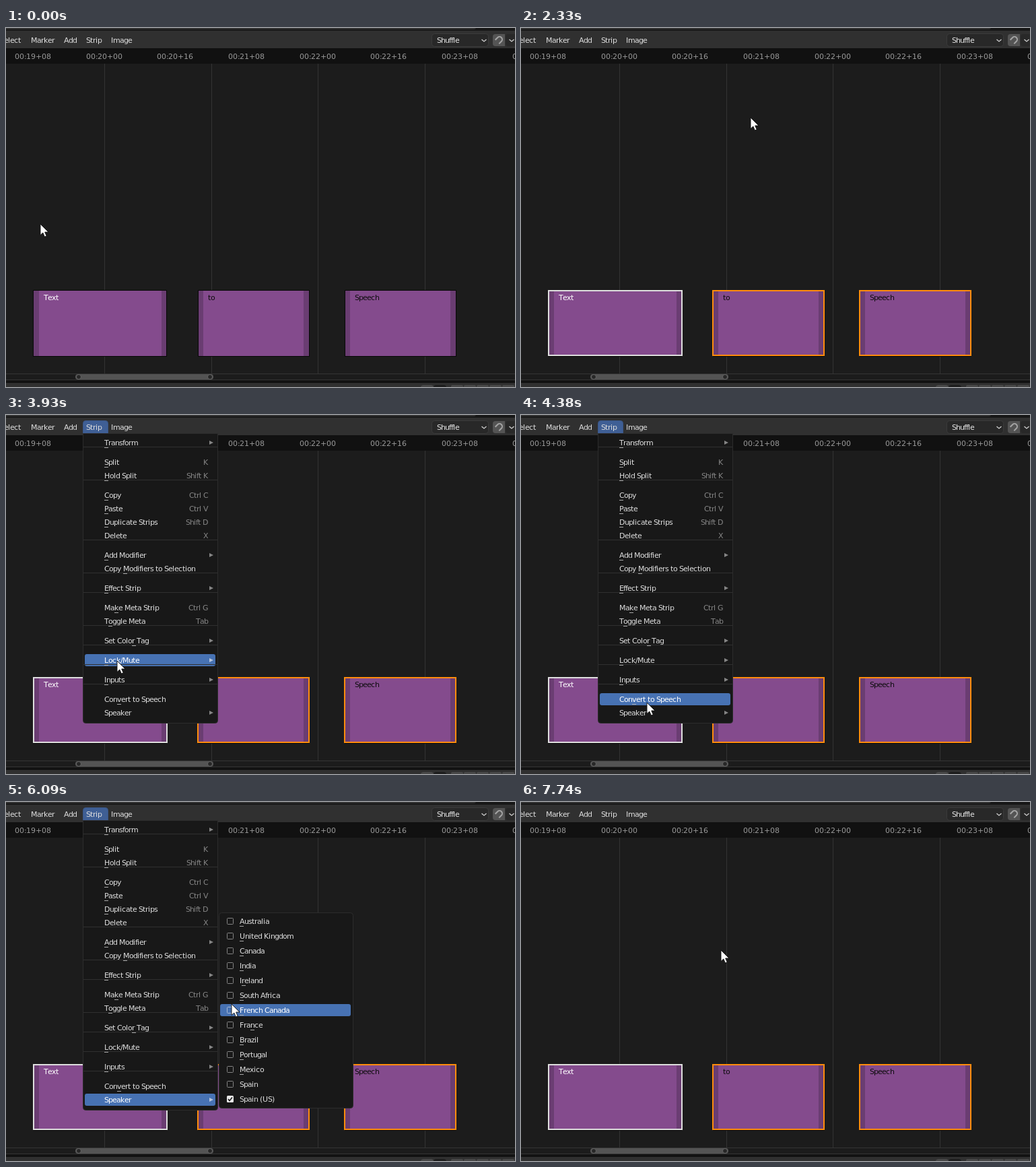
Animation of 756 by 533 pixels, one loop 8000 ms. Source, as an HTML page with a canvas:

```html
<!DOCTYPE html>
<html>
<head>
<meta charset="utf-8">
<style>
html, body { margin: 0; width: 100%; height: 100%; overflow: hidden; background: #1c1c1c; }
canvas { display: block; }
</style>
</head>
<body>
<canvas id="stage" width="756" height="533"></canvas>
<script>
const ctx = document.getElementById('stage').getContext('2d');
const LOOP = 8000, STEP = 85;
const SELECT_START = 720, SELECT_END = 1960;
const MENU_OPEN = 3200, SUBMENU_OPEN = 4560, MENU_CLOSE = 7090;
const BLUE = '#4772b3', INK = '#dedede', DIM = '#858585', ORANGE = '#ff8c0d';

// Pointer moves: first and last visible change, then the place reached.
const moves = [
  [60, 540, 13, 324],
  [720, 1330, 622, 458],
  [1420, 1510, 638, 454],
  [1600, 1780, 673, 453],
  [2150, 2330, 341, 133],
  [2500, 3020, 133, 16],
  [3570, 3930, 165, 365],
  [4110, 4380, 187, 427],
  [4470, 4650, 188, 439],
  [4830, 5190, 330, 437],
  [5280, 5550, 334, 336],
  [5640, 5820, 336, 291],
  [5910, 6360, 333, 308],
  [7650, 7740, 297, 220]
];

// '&' marks the underlined letter; after '|' comes a shortcut, or '>' for a submenu.
const menuGroups = [
  ['&Transform|>'],
  ['&Split|K', '&Hold Split|Shift K'],
  ['&Copy|Ctrl C', '&Paste|Ctrl V', '&Duplicate Strips|Shift D', 'Delete|X'],
  ['&Add Modifier|>', 'Copy &Modifiers to Selection'],
  ['&Effect Strip|>'],
  ['Ma&ke Meta Strip|Ctrl G', 'T&oggle Meta|Tab'],
  ['Set Colo&r Tag|>'],
  ['&Lock/Mute|>'],
  ['&Inputs|>'],
  ['Con&vert to Speech', 'Speaker|>']
];
const countries = ['&Australia', '&United Kingdom', '&Canada', '&India', 'I&reland', '&South Africa',
  '&French Canada', 'Fra&nce', '&Brazil', '&Portugal', '&Mexico', 'Spain', 'Spain (US)'];
const strips = [
  { name: 'Text', left: 41, right: 238, ink: '#fff', edge: INK },
  { name: 'to', left: 285.6, right: 449.6, ink: '#0c0c0c', edge: ORANGE },
  { name: 'Speech', left: 503.6, right: 667.6, ink: '#0c0c0c', edge: ORANGE }
];

function pointerAt(t) {
  let x = 51, y = 291;
  for (const [start, end, toX, toY] of moves) {
    if (t < start) break;
    const gaps = Math.round((end - start) / STEP);
    const step = 1 + Math.floor((t - start) / (end - start) * gaps + 0.1);
    const f = Math.min(1, step / (gaps + 1));
    const ease = f * f * (3 - 2 * f);
    x += (toX - x) * ease;
    y += (toY - y) * ease;
  }
  return [Math.round(x), Math.round(y)];
}

function rect(x, y, w, h, color) {
  ctx.fillStyle = color;
  ctx.fillRect(x, y, w, h);
}

function round(x, y, w, h, r, fill, stroke) {
  ctx.beginPath();
  ctx.roundRect(x, y, w, h, r);
  if (fill) { ctx.fillStyle = fill; ctx.fill(); }
  if (stroke) { ctx.strokeStyle = stroke; ctx.lineWidth = 1; ctx.stroke(); }
}

function line(points, color, width) {
  ctx.beginPath();
  points.forEach(([x, y]) => ctx.lineTo(x, y));
  ctx.strokeStyle = color;
  ctx.lineWidth = width;
  ctx.stroke();
}

function shape(points, color) {
  ctx.beginPath();
  points.forEach(([x, y]) => ctx.lineTo(x, y));
  ctx.closePath();
  ctx.fillStyle = color;
  ctx.fill();
}

// Glyphs sit on whole pixels: each advance is the 11px width rounded down.
const advances = {};
function advance(ch) {
  if (!(ch in advances)) {
    ctx.font = '1100px "DejaVu Sans", sans-serif';
    advances[ch] = Math.floor(ctx.measureText(ch).width / 100 + 0.01);
  }
  return advances[ch];
}

const widthOf = s => [...s].reduce((sum, ch) => sum + advance(ch), 0);

function text(s, x, y, color) {
  for (const ch of s) {
    const step = advance(ch);
    ctx.font = '11px "DejaVu Sans", sans-serif';
    ctx.fillStyle = color;
    ctx.fillText(ch, x, y + 4);
    x += step;
  }
}

const textRight = (s, x, y, color) => text(s, x - widthOf(s), y, color);

function label(s, x, y, color) {
  const [before, after] = s.split('&');
  text(s.replace('&', ''), x, y, color);
  if (after) rect(x + widthOf(before), y + 7, 6, 1, '#a8a8a8');
}

function chevron(x, y) {
  line([[x - 3.5, y - 1], [x, y + 2], [x + 3.5, y - 1]], '#d0d0d0', 1.3);
}

function drawMagnet(x, y) {
  ctx.save();
  ctx.translate(x, y);
  ctx.rotate(Math.PI / 4);
  ctx.beginPath();
  ctx.moveTo(-4, 5);
  ctx.arc(0, 0, 4, Math.PI, 0);
  ctx.lineTo(4, 5);
  ctx.strokeStyle = '#a5a5a5';
  ctx.lineWidth = 2;
  ctx.stroke();
  ctx.restore();
}

function drawHeader(t, [x, y]) {
  rect(0, 0, 756, 4, '#171717');
  round(-5, -4, 703, 6, 3, '#303030');
  rect(0, 4, 756, 26, '#303030');
  const open = t >= MENU_OPEN && t < MENU_CLOSE;
  const hover = t < MENU_OPEN && x >= 114 && x < 152 && y < 28;
  if (open) round(114.5, 8.5, 37, 19, [4, 4, 0, 0], '#3f5f95', '#3a5687');
  else if (hover) round(114, 8, 38, 19, 4, '#484848');
  textRight('Select', 22, 18, INK);
  let left = 37;
  for (const name of ['Marker', 'Add', 'Strip', 'Image']) {
    text(name, left, 18, INK);
    left += widthOf(name) + 14;
  }

  round(632.5, 8.5, 84, 19, 4, '#282828', '#3b3b3b');
  text('Shuffle', 640, 18, '#e6e6e6');
  chevron(710, 18);
  round(742, 9, 24, 18, 4, '#282828');
  round(723, 9, 18, 18, [4, 0, 0, 4], '#545454');
  chevron(751, 18);
  drawMagnet(733, 17);
}

function drawStrip({ name, left, right, ink, edge }, selected) {
  const span = (from, to, y, h, color) => {
    const x = Math.round(from);
    rect(x, y, Math.round(to) - x, h, color);
  };
  span(left - 1, right + 1, 389, 99, '#080808');
  span(left, right, 390, 97, '#6a3d72');
  span(left + 7.5, right - 7.5, 390, 97, '#844b8d');
  if (selected) {
    const x = Math.floor(left);
    ctx.strokeStyle = edge;
    ctx.lineWidth = 2;
    ctx.strokeRect(x, 390, Math.floor(right) + 1 - x, 96);
  }
  text(name, Math.floor(left) + 15, 400, ink);
}

function drawTimeline(selected) {
  rect(0, 0, 756, 533, '#1c1c1c');
  rect(0, 30, 756, 23, '#111');
  for (let i = 0; i < 4; i++) rect(Math.round(146.4 + 158.4 * i), 53, 1, 470, '#333');
  // One label every 16 frames, 24 frames to the second.
  for (let i = 0; i < 8; i++) {
    const frame = 19 * 24 + 8 + 16 * i;
    const rest = String(frame % 24).padStart(2, '0');
    text(`00:${Math.floor(frame / 24)}+${rest}`, Math.round(13.2 + 105.6 * i), 42, '#999');
  }
  strips.forEach(strip => drawStrip(strip, selected));

  rect(0, 513, 756, 10, '#353535');
  rect(0, 514, 756, 8, '#1c1c1c');
  round(103, 514, 205, 8, 4, '#545454');
  [108, 303].forEach(x => round(x - 3.5, 514.5, 7, 7, 3.5, '#272727', '#666'));
  rect(0, 523, 756, 4, '#121212');
  rect(0, 527, 756, 6, '#303030');
  round(616, 530, 19, 8, 4, '#484848');
  round(635, 530, 19, 8, 4, '#1d1d1d');
  for (let x = 661; x < 756; x += 19) round(x, 530, 18, 8, 2, '#484848');
}

function drawSelection([x, y]) {
  const w = x - 13, h = y - 325;
  rect(13, 325, w, h, 'rgba(255,255,255,.055)');
  ctx.lineWidth = 1;
  ctx.strokeStyle = '#333';
  ctx.strokeRect(13.5, 325.5, w, h);
  ctx.setLineDash([4, 4]);
  ctx.strokeStyle = '#fff';
  ctx.strokeRect(13.5, 325.5, w, h);
  ctx.setLineDash([]);
}

function drawMenu(y, submenu) {
  round(114.5, 27.5, 200, 430, [0, 0, 4, 4], '#181818', '#2c2c2c');
  let cy = 41;
  menuGroups.forEach((group, i) => {
    if (i) {
      rect(115, cy - 14, 199, 1, '#303030');
      cy += 9 - 9 * (i === 0);
    }
    for (const item of group) {
      const [name, extra] = item.split('|');
      const active = submenu ? name === 'Speaker' : Math.abs(y - cy) <= 10;
      if (active) round(117, cy - 9, 194, 18, 3, BLUE);
      label(name, 146, cy, active ? '#fff' : INK);
      if (extra === '>') shape([[302, cy - 3], [302, cy + 3], [308, cy]], active ? '#b5c4dc' : DIM);
      else if (extra) textRight(extra, 300, cy, DIM);
      cy += 20;
    }
  });
}

function drawSubmenu([x, y]) {
  round(316.5, 164.5, 199, 290, 4, '#181818', '#2c2c2c');
  countries.forEach((name, i) => {
    const cy = 177 + 22 * i;
    const active = x >= 316 && Math.abs(y - cy) <= 10;
    if (active) round(318, cy - 9, 194, 18, 3, BLUE);
    if (i === countries.length - 1) {
      round(328, cy - 5, 10, 10, 1.5, '#e8e8e8');
      line([[330, cy], [332, cy + 2.5], [336, cy - 2.5]], '#181818', 1.5);
    } else {
      round(328.5, cy - 4.5, 9, 9, 1, null, active ? '#a9bad6' : DIM);
    }
    label(name, 347, cy, active ? '#fff' : INK);
  });
}

function drawPointer([x, y]) {
  const outline = [[0, 0], [0, 16.5], [3.8, 13], [6.4, 19], [9.2, 17.8], [6.7, 12], [12, 12]]
    .map(([dx, dy]) => [x + dx, y + dy]);
  shape(outline, '#fff');
  line([...outline, outline[0]], '#111', 0.9);
}

function draw() {
  const t = performance.now() % LOOP;
  const pointer = pointerAt(t);
  drawTimeline(t >= SELECT_END);
  drawHeader(t, pointer);
  // The box trails the pointer by one step.
  if (t >= SELECT_START && t < SELECT_END) drawSelection(pointerAt(t - STEP));
  if (t >= MENU_OPEN && t < MENU_CLOSE) {
    const submenu = t >= SUBMENU_OPEN;
    drawMenu(pointer[1], submenu);
    if (submenu) drawSubmenu(pointer);
  }
  drawPointer(pointer);
  requestAnimationFrame(draw);
}
draw();
</script>
</body>
</html>
```
